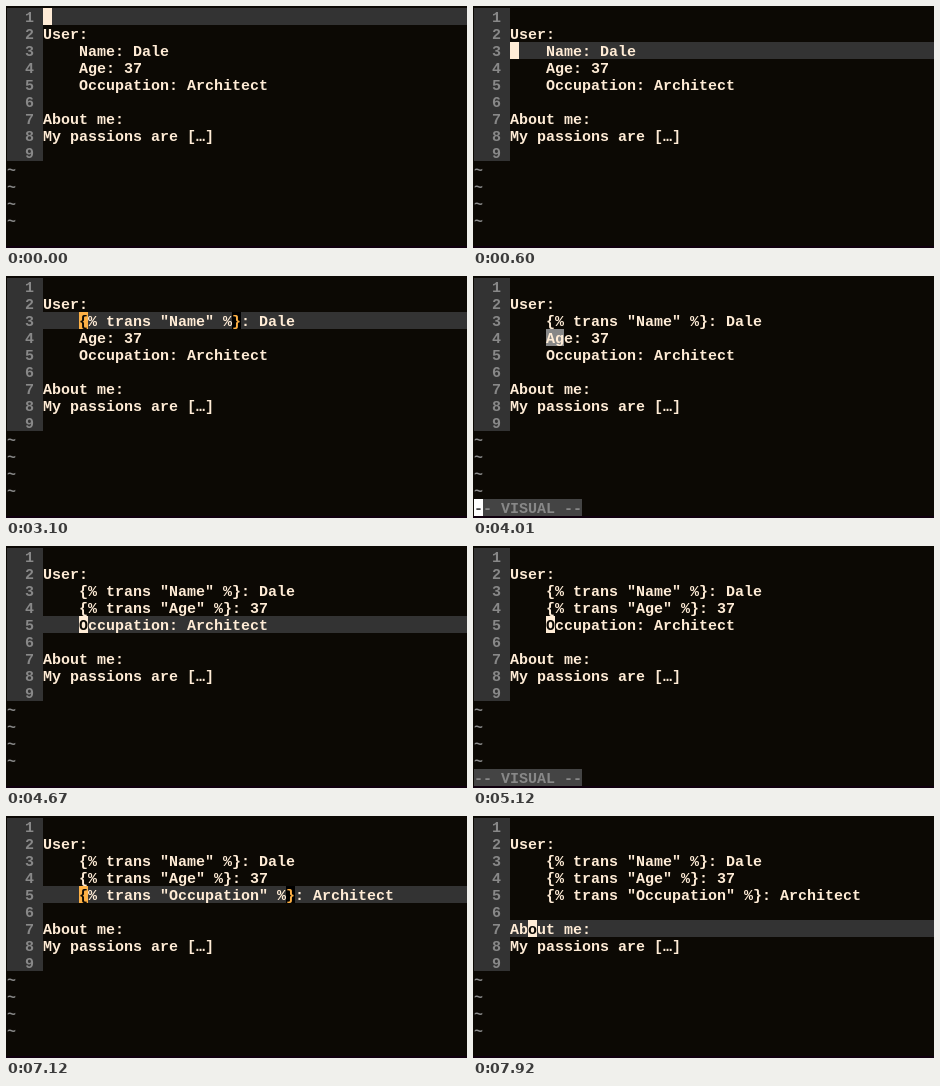
An HTML page for the animation above (8 s loop, 461x242 px).

```html
<!DOCTYPE html>
<html lang="en">
<head>
<meta charset="utf-8">
<title>Editor: wrapping words in trans tags</title>
<style>
html, body { margin: 0; width: 100%; height: 100%; overflow: hidden; background: #0c0904; }
svg { display: block; width: 461px; height: 242px; }
text { font: bold 15px "Liberation Mono", "Courier New", monospace; white-space: pre; }
</style>
</head>
<body>
<svg id="stage" viewBox="0 0 461 242" xmlns="http://www.w3.org/2000/svg"></svg>
<script>
const LOOP = 8000, CELL = 9, ROW = 17, LEFT = 37, TOP = 2, INDENT = 4, STATUS_ROW = 14;
const BG = '#0c0904', INK = '#ffecd6', GREY = '#333333', DIM = '#888888',
      SELECT = '#878787', BAR = '#444444', MATCH = '#fdb045';
const STATUS = '-- VISUAL --';
const LINES = ['', 'User:', '    Name: Dale', '    Age: 37', '    Occupation: Architect',
               '', 'About me:', 'My passions are […]', ''];
const WRAP_AT = { 3: 3100, 4: 4450, 5: 6900 };

// Cursor steps: time, row, column, mode.
// Modes: normal, enter (visual begins), visual, idle (cursor rests on the status line).
const steps = [[0, 1, 0, 'normal'], [100, 2, 0, 'normal']];
const add = (time, row, col, mode = 'normal') => steps.push([time, row, col, mode]);
const sweep = (start, gap, count, row, col, mode) => {
  for (let i = 0; i < count; i++) add(start + i * gap, row, col + i, mode);
};
sweep(600, 178, 5, 3, 0, 'normal');
add(1490, 3, 4, 'enter');
sweep(1680, 130, 4, 3, 4, 'visual');
add(2200, 3, 7, 'idle');
add(3100, 3, 4);
add(3290, 4, 4);
add(3470, 4, 4, 'enter');
sweep(3760, 130, 2, 4, 5, 'visual');
add(4010, 4, 6, 'idle');
add(4450, 4, 4);
add(4620, 5, 4);
add(4800, 5, 4, 'enter');
add(5120, 5, 4, 'visual');
sweep(5220, 134, 8, 5, 5, 'visual');
add(6300, 5, 13, 'visual');
add(6530, 5, 13, 'idle');
add(6900, 5, 4);
add(7140, 6, 0);
add(7380, 7, 4);
add(7670, 7, 3);
add(7920, 7, 2);

const stage = document.getElementById('stage');
const colX = col => LEFT + col * CELL;
const rowY = row => TOP + (row - 1) * ROW;
const escapeText = s => s.replace(/&/g, '&amp;').replace(/</g, '&lt;');
const rect = (x, y, w, h, fill) =>
  `<rect x="${x}" y="${y}" width="${w}" height="${h}" fill="${fill}"/>`;
const label = (x, row, s, fill) =>
  `<text x="${x}" y="${rowY(row) + 14}" fill="${fill}" xml:space="preserve">${escapeText(s)}</text>`;
const block = (x, row, char, fill, ink) =>
  rect(x, rowY(row), CELL, ROW, fill) + label(x, row, char, ink);

function lineText(row, time) {
  const line = LINES[row - 1];
  return time >= WRAP_AT[row] ? line.replace(/(\w+):/, '{% trans "$1" %}:') : line;
}

function draw([time, row, col, mode]) {
  let out = rect(0, 0, 461, 242, BG) + rect(0, 240, 461, 2, '#10000f')
          + rect(1, TOP, 4 * CELL, 9 * ROW, GREY);
  if (mode === 'normal') out += rect(LEFT, rowY(row), 461 - LEFT, ROW, GREY);
  if (mode === 'visual' || mode === 'idle') {
    out += rect(colX(INDENT), rowY(row), (col - INDENT) * CELL, ROW, SELECT)
         + rect(1, rowY(STATUS_ROW), STATUS.length * CELL, ROW, BAR)
         + label(1, STATUS_ROW, STATUS, DIM);
  }
  LINES.forEach((_, i) => {
    out += label(1 + 2 * CELL, i + 1, String(i + 1), DIM);
    // Start at the first letter so the indent needs no preserved spaces.
    const line = lineText(i + 1, time), text = line.trimStart();
    out += label(colX(line.length - text.length), i + 1, text, INK);
  });
  for (let r = 10; r < STATUS_ROW; r++) out += label(1, r, '~', DIM);

  const line = lineText(row, time), char = line[col] || ' ';
  if (mode === 'idle') {
    out += block(1, STATUS_ROW, '-', '#ffffff', BAR);
  } else if (mode !== 'enter') {
    const brace = char === '{';
    out += block(colX(col), row, char, brace ? MATCH : INK, BG);
    if (brace) out += block(colX(line.indexOf('}')), row, '}', '#000000', MATCH);
  }
  stage.innerHTML = out;
}

let shown = null;
const origin = performance.now();
function tick() {
  const time = (performance.now() - origin) % LOOP;
  const step = steps.filter(s => s[0] <= time).pop();
  if (step !== shown) draw(shown = step);
  requestAnimationFrame(tick);
}
tick();
</script>
</body>
</html>
```
